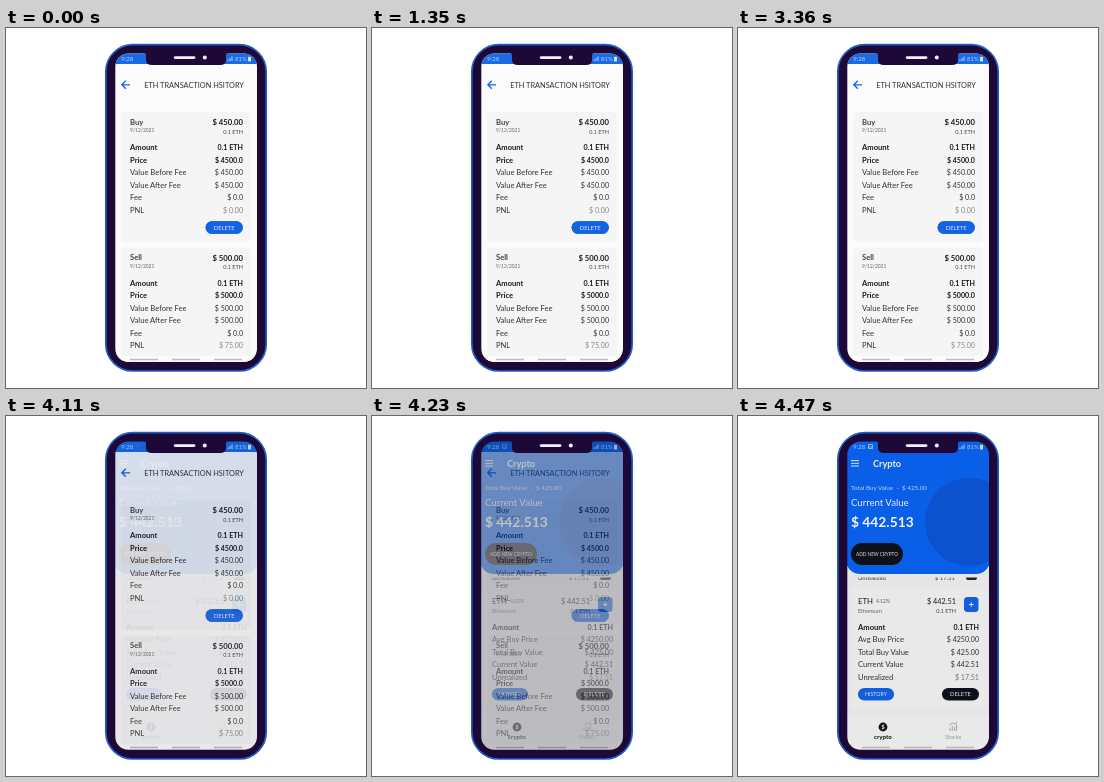
Recreate the animation shown at these times as an HTML page. Size 360x360 px, loop 4500 ms.

```html
<!DOCTYPE html>
<html lang="en">
<head>
<meta charset="utf-8">
<title>Wallet screens</title>
<style>
  html, body { margin: 0; width: 100%; height: 100%; overflow: hidden; background: #fff; }
  svg { display: block; width: 100%; height: 100%; }
  text { font-family: Lato, sans-serif; white-space: pre; }
</style>
</head>
<body>
<svg id="stage" viewBox="0 0 360 360"></svg>
<script>
const LOOP = 4500, FADE_START = 4080, FADE = 405, STEP = 30;
const BLUE = '#1463e4';

const text = (x, y, size, str, fill = '#333', weight = 400, anchor = 'start') =>
  `<text x="${x}" y="${y}" font-size="${size}" fill="${fill}" font-weight="${weight}" text-anchor="${anchor}">${str}</text>`;
const rect = (x, y, w, h, r, fill) =>
  `<rect x="${x}" y="${y}" width="${w}" height="${h}" rx="${r}" fill="${fill}"/>`;
const circle = (x, y, r, fill) => `<circle cx="${x}" cy="${y}" r="${r}" fill="${fill}"/>`;
const line = (d, stroke, width) => `<path d="${d}" fill="none" stroke="${stroke}" stroke-width="${width}"/>`;

const pill = (x, y, w, h, fill, label, size) =>
  rect(x, y, w, h, h / 2, fill) + text(x + w / 2, y + h / 2 + 2, size, label, '#dfe8fb', 400, 'middle');

// Label and value pairs, one every 12.5 px; the first `bold` rows are heavy
const rows = (left, right, top, bold, items) => items.map(([label, value, fill = '#333'], i) => {
  const weight = i < bold ? 700 : 400, ink = i < bold ? '#1c1c22' : '#333', y = top + i * 12.5;
  return text(left, y, 7.6, label, ink, weight) +
    text(right, y, 7.1, value, i < bold ? ink : fill, weight, 'end');
}).join('');

const statusBar = () =>
  text(115.3, 33.2, 6, '9:28', '#b9d3fb') +
  line('M222 33v-1.5M224 33v-3M226 33v-4.5', '#b9d3fb', 1) +
  text(229, 33.2, 6, '81%', '#b9d3fb') +
  rect(242, 28.8, 3, 4.6, .6, '#d5e4fc');

const navMarks = () => line('M124 331.5h28M166 331.5h28M208 331.5h28', '#bdbdc0', 1.5);

const trade = (dy, kind, total, price, pnl) =>
  rect(115, 84 + dy, 130, 130, 5, '#f5f5f6') +
  text(124, 96.6 + dy, 7.6, kind, '#444', 700) +
  text(237, 97.2 + dy, 7.7, total, '#1c1c22', 700, 'end') +
  text(124, 104 + dy, 4.9, '9/12/2021', '#666') +
  text(237, 105.5 + dy, 5.5, '0.1 ETH', '#444', 400, 'end') +
  rows(124, 237, 122.3 + dy, 2, [
    ['Amount', '0.1 ETH'], ['Price', price], ['Value Before Fee', total],
    ['Value After Fee', total], ['Fee', '$ 0.0'], ['PNL', pnl, '#888'],
  ]) +
  pill(199.6, 193.2, 37.2, 12.6, BLUE, 'DELETE', 5.8);

const historyScreen = () =>
  rect(108, 25, 144, 309, 0, '#fbfbfc') +
  rect(108, 25, 144, 11, 0, '#1a6be4') + statusBar() +
  line('M124 56.8h-8M119.8 52.8l-4 4l4 4', BLUE, 1.3) +
  text(138.2, 60, 7.38, 'ETH TRANSACTION HSITORY') +
  trade(0, 'Buy', '$ 450.00', '$ 4500.0', '$ 0.00') +
  trade(135.5, 'Sell', '$ 500.00', '$ 5000.0', '$ 75.00') +
  rect(108, 328, 144, 6, 0, '#fbfbfc') + navMarks();

const cryptoScreen = () =>
  rect(108, 25, 144, 309, 0, '#efeff0') +
  `<g clip-path="url(#list)">${text(120, 164.3, 6, 'Unrealized')}${
    text(217, 164.3, 6, '$ 17.51', '#333', 400, 'end')}${rect(228, 153, 11, 11, 2, '#222')}</g>` +
  `<g clip-path="url(#header)">${rect(108, 10, 144, 150, 0, '#0a63f0')}${circle(231, 106, 44, '#0b55d6')}</g>` +
  statusBar() +
  line('M130.5 28.5h4v4h-4zM130.5 32l1.8-1.8l2 2', '#b9d3fb', .8) +
  line('M113 44.6h8M113 47.3h8M113 50h8', '#e4eeff', 1) +
  text(135, 51, 9.2, 'Crypto', '#f4f8ff', 700) +
  text(113, 74.3, 6.3, 'Total Buy Value  -  $ 425.00', '#c3d8fc') +
  text(113, 90, 9.6, 'Current Value', '#f0f5ff') +
  text(113, 111, 13.8, '$ 442.513', '#fff', 700) +
  pill(113, 127, 52, 22, '#10121a', 'ADD NEW CRYPTO', 4.7) +
  rect(113, 171, 134, 122, 5, '#f2f2f3') +
  text(120, 188, 7.8, 'ETH', '#1c1c22') +
  text(138, 186.5, 5, '4.12%', '#555') +
  text(120, 197, 5.6, 'Ethereum', '#667') +
  text(218, 187.5, 7.3, '$ 442.51', '#1c1c22', 400, 'end') +
  text(218, 197, 5.5, '0.1 ETH', '#444', 400, 'end') +
  rect(226, 181, 14.5, 15, 3.5, BLUE) + line('M231 188.5h4.6M233.3 186.2v4.6', '#fff', .9) +
  rows(120, 241, 213.5, 1, [
    ['Amount', '0.1 ETH'], ['Avg Buy Price', '$ 4250.00'], ['Total Buy Value', '$ 425.00'],
    ['Current Value', '$ 442.51'], ['Unrealized', '$ 17.51', '#777'],
  ]) +
  pill(120, 272, 36, 12.5, BLUE, 'HISTORY', 5.3) +
  pill(204, 272, 37, 12.5, '#10121a', 'DELETE', 5.8) +
  rect(108, 301, 144, 33, 0, '#f2f2f3') +
  circle(145, 311, 4.4, '#111') + text(145, 313.2, 6, '$', '#fff', 700, 'middle') +
  text(145, 323, 6.2, 'crypto', '#111', 700, 'middle') +
  line('M212 315v-3M214.3 315v-5M216.6 315v-4M218.5 315v-7M211.5 309l3-2l2 1l2.5-2', '#aaa', 1) +
  text(215, 323, 5.8, 'Stocks', '#999', 400, 'middle') + navMarks();

document.getElementById('stage').innerHTML = `
  <defs>
    <clipPath id="screen"><rect x="109.3" y="25.5" width="141.7" height="308.2" rx="13"/></clipPath>
    <clipPath id="header"><path d="M108 25h144v119a14 14 0 0 1-14 14h-116a14 14 0 0 1-14-14z"/></clipPath>
    <clipPath id="list"><path d="M108 161.5h144v8h-144z"/></clipPath>
  </defs>
  <rect x="99.8" y="16.6" width="160.4" height="326.4" rx="27" fill="#1d0838" stroke="#1f5fc6" stroke-width="1.7"/>
  <g clip-path="url(#screen)">
    ${rect(108, 25, 144, 310, 0, '#08040e')}
    <g id="history">${historyScreen()}</g>
    <g id="crypto">${cryptoScreen()}</g>
  </g>
  <path d="M138 25h84q-2 0-2 3v4q0 5-6 5h-68q-6 0-6-5v-4q0-3-2-3z" fill="#1d0838"/>
  ${rect(167.8, 28.2, 21.6, 2.8, 1.4, '#f4f4f8')}${circle(198.8, 29.6, 2, '#f4f4f8')}`;

const historyLayer = document.getElementById('history');
const cryptoLayer = document.getElementById('crypto');

function render(now) {
  const t = Math.floor(now % LOOP / STEP) * STEP;
  const fade = Math.max(0, (t - FADE_START) / FADE);
  historyLayer.setAttribute('opacity', 1 - fade);
  cryptoLayer.setAttribute('opacity', fade);
}

let start;
function tick(now) {
  start ??= now;
  render(now - start);
  requestAnimationFrame(tick);
}
render(0);
requestAnimationFrame(tick);
</script>
</body>
</html>
```
